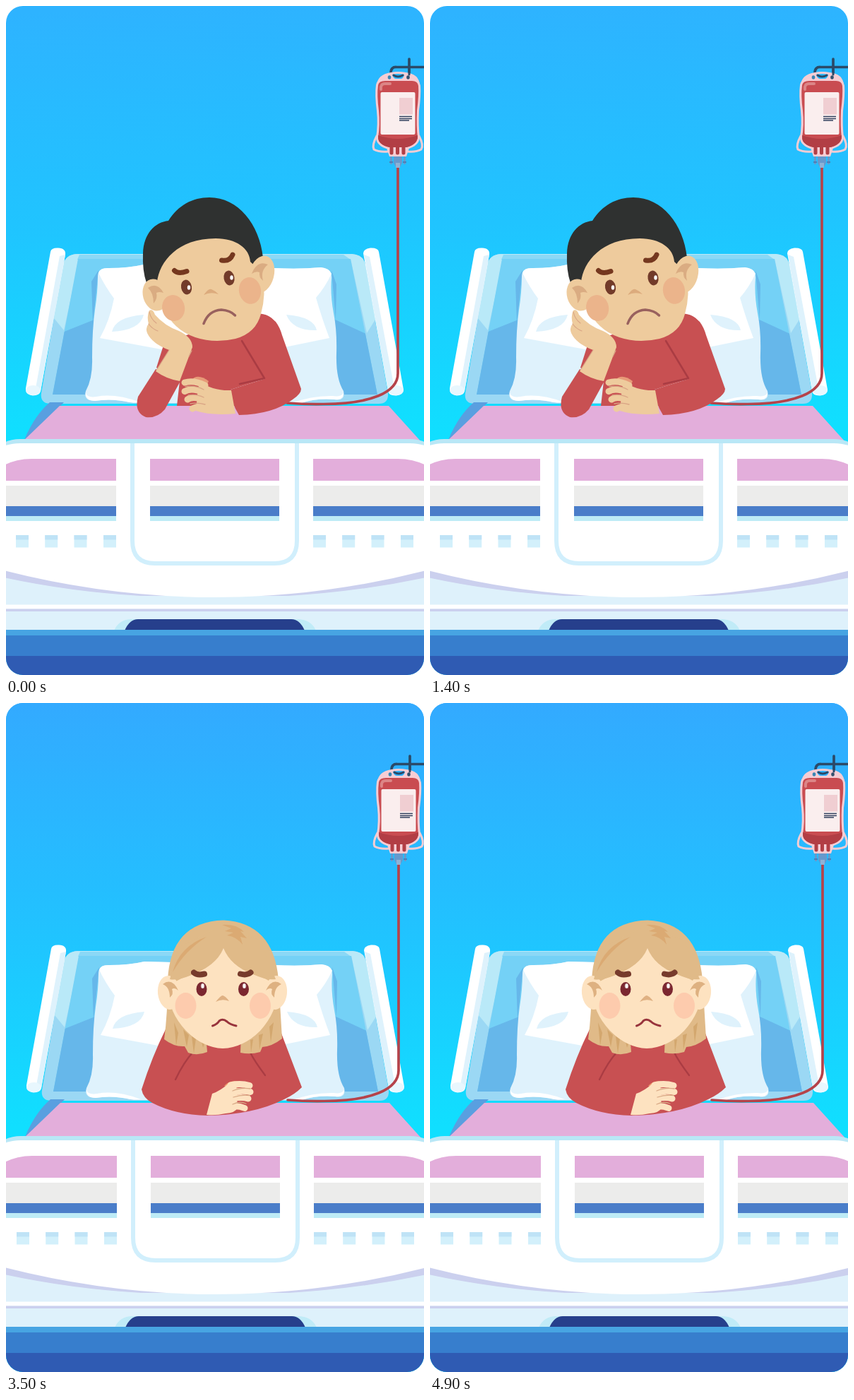
Animation, 592 px wide and 947 px high, one loop 5.6 s. Source, as an HTML page:

```html
<!DOCTYPE html>
<html lang="en">
<head>
<meta charset="utf-8">
<title>Hospital bed</title>
<style>
html, body { margin: 0; width: 100%; height: 100%; overflow: hidden; background: #fff; }
svg { display: block; width: 100vw; height: 100vh; }
.room { animation: nudge 5.6s step-end infinite; }
.second { animation: second 5.6s step-end infinite; }
.first { animation: first 5.6s step-end infinite; }
.glance { animation: glance 1.4s step-end infinite; }
.peek { animation: peek 1.4s step-end infinite; }
@keyframes nudge { 0% { transform: none; } 50%, 100% { transform: translateX(1px); } }
@keyframes first { 0% { opacity: 1; } 50%, 100% { opacity: 0; } }
@keyframes second { 0% { opacity: 0; } 50%, 100% { opacity: 1; } }
@keyframes glance { 0% { transform: none; } 50%, 100% { transform: translate(-6.5px, 2px); } }
@keyframes peek { 0% { transform: none; } 50%, 100% { transform: translate(1.5px, -8px); } }
.line { fill: none; stroke-linecap: round; stroke-linejoin: round; }
</style>
</head>
<body>
<svg viewBox="0 0 592 947" preserveAspectRatio="none">
<defs>
  <clipPath id="card"><rect width="592" height="947" rx="24"/></clipPath>
  <linearGradient id="skyA" gradientUnits="userSpaceOnUse" x1="280" y1="0" x2="300" y2="600">
    <stop stop-color="#2eb3ff"/><stop offset=".5" stop-color="#20c4ff"/><stop offset="1" stop-color="#10dfff"/>
  </linearGradient>
  <linearGradient id="skyB" gradientUnits="userSpaceOnUse" x1="0" y1="0" x2="0" y2="600">
    <stop stop-color="#33aaff"/><stop offset=".5" stop-color="#22c1ff"/><stop offset="1" stop-color="#10dfff"/>
  </linearGradient>
  <clipPath id="board"><path d="M102 358H488L526 550H66Z"/></clipPath>
  <path id="pouch" d="M527 112Q528 106 537 106H575Q583 106 584 113 585 126 582 148 581 170 583 186 582 196 567 200H543Q527 196 527 186 530 168 528 148 525 126 527 112Z"/>
  <g id="tile"><path fill="#d3f0fb" d="M0 749h18v17.500h-18z"/><path fill="#bfe3f6" d="M0 749h18v6.500h-18z"/></g>
  <g id="tiles"><use href="#tile"/><use href="#tile" x="41.200"/><use href="#tile" x="82.500"/><use href="#tile" x="124"/></g>
</defs>

<g clip-path="url(#card)">
<rect width="592" height="947" fill="url(#skyA)"/>
<rect class="second" width="592" height="947" fill="url(#skyB)"/>

<g class="room">
  <!-- headboard -->
  <path fill="#9bd8f4" d="M100 351H490Q506 352 509 366L541 548Q542 563 528 563H62Q48 562 50 548L80 368Q84 352 100 351Z"/>
  <path fill="#b9e9f8" d="M100 351H490Q506 352 509 366L523 444 511 463 488 358H104L82 459 68 442 80 368Q84 352 100 351Z"/>
  <path fill="#8ad8f6" d="M104 352H478L488 359H101Z"/>
  <g clip-path="url(#board)">
    <path fill="#74d1f6" d="M60 358H535V566H60Z"/>
    <path fill="#66b7ea" d="M60 470 125 444V566H60ZM462 442 540 478V566H462Z"/>
    <path fill="#66b7ea" d="M131 374L121 390 123 450ZM461 374 468 394 467 445Z"/>
  </g>

  <!-- side rails -->
  <path fill="#fff" d="M63 348 28 541Q27 550 38 551.500 48 551 49 545L84 352Q85 343 74 342.500 64 342 63 348Z"/>
  <path fill="#def2fc" d="M76 354 84 352 49 545 42 541Z"/>
  <ellipse cx="38.500" cy="544" rx="10.500" ry="7" fill="#e8f7fe"/>
  <path fill="#fff" d="M506 350 541 545Q542 552 553 551.500 563 550 563 543L528 348Q527 342 516 342.500 506 344 506 350Z"/>
  <path fill="#def2fc" d="M507 352 515 355 550 541 541 545Z"/>
  <ellipse cx="552.500" cy="544" rx="10.500" ry="7" fill="#e8f7fe"/>

  <!-- pillow -->
  <path fill="#dff2fc" d="M130 382Q131 370 145 371 174 371 195 366L380 371Q415 373 446 370 461 372 461 384 459 408 464 435 469 460 468 492 467 528 478 545 481 560 465 557 440 555 418 562H180Q151 555 126 559 109 559 113 545 123 527 122 498 122 458 126 430 130 405 130 382Z"/>
  <path fill="#fff" d="M131 378Q133 370 147 371 174 371 195 366L380 371Q415 373 446 370 458 371 461 379 452 398 439 413 448 444 458 470L380 486H220L133 470Q147 445 153 414 141 398 131 378Z"/>
  <path fill="#fff" d="M113 547Q114 555 128 553 155 548 190 561H175Q150 555 126 559 112 559 113 547ZM478 547Q476 554 463 552 435 551 405 562H418Q440 555 465 557 478 558 478 547Z"/>
  <path fill="#dff2fc" d="M150 461Q155 440 195 437 190 459 150 461ZM397 437Q436 440 440 459 406 460 397 437Z"/>

  <!-- blanket -->
  <path fill="#599fe0" d="M62 561H82L30 614H26Q40 580 62 561Z"/>
  <path fill="#e3aedb" d="M76 566H542L589 618H22Z"/>

  <!-- footboard -->
  <path fill="#def1fb" d="M-3 790H595V885H-3Z"/>
  <path fill="#cbd0ee" d="M-3 790H595V809Q500 829 400 835H190Q90 829-3 809Z"/>
  <path fill="#b9e7f6" d="M-3 618Q8 613 20 613H572Q584 613 595 618V630H-3Z"/>
  <path fill="#fff" d="M-3 623Q8 619 20 619H572Q584 619 595 623V799Q296 875-3 799Z"/>
  <path fill="#e3aedb" d="M-3 650Q15 641 36 641H156V672H-3ZM204 641H387V672H204ZM435 641H555Q576 641 595 650V672H435Z"/>
  <path fill="#ececeb" d="M-3 679H156V708H-3ZM204 679H387V708H204ZM435 679H595V708H435Z"/>
  <path fill="#4a7dc9" d="M-3 708H156V722H-3ZM204 708H387V722H204ZM435 708H595V722H435Z"/>
  <path fill="#bdebf6" d="M-3 722H156V729H-3ZM204 722H387V729H204ZM435 722H595V729H435Z"/>
  <path fill="none" stroke="#d1effc" stroke-width="6" d="M179 619V757Q179 789 211 789H380Q412 789 412 757V619"/>
  <use href="#tiles" x="14"/><use href="#tiles" x="435"/>
  <path fill="#fff" d="M-3 847.500H595V853.500H-3Z"/>
  <path fill="#cbd0ee" d="M-3 853.500H595V857H-3Z"/>
  <path fill="#c0ebf7" d="M153 884Q160 868 178 868H412Q432 868 439 884Z"/>
  <path fill="#263f8c" d="M168 884Q175 868 187 868H404Q416 868 423 884Z"/>
  <path fill="#47a4e2" d="M-3 883H595V892H-3Z"/>
  <path fill="#377ecd" d="M-3 891H595V921H-3Z"/>
  <path fill="#2f5bb3" d="M-3 920H595V950H-3Z"/>

  <!-- drip -->
  <path class="line" stroke="#b5434a" stroke-width="3.700" d="M555 229V520C555 548 515 563 450 563.500Q425 564 398 562"/>
  <path class="line" stroke="#2b4a68" stroke-width="3.700" d="M595 86.500H553Q545 86 545 95M571 75V98"/>
  <path fill="#f6cdd4" fill-rule="evenodd" d="M525 112Q526 97 545 94 555 92 566 94 585 96 586 112ZM547 97Q548 104 556 104 563 104 564 97 555 95 547 97Z"/>
  <path fill="#f6cdd4" d="M538 198H572L567 213H543Z"/>
  <path class="line" stroke="#f6cdd4" stroke-width="3" d="M525 184Q518 197 521 203 528 207 541 206M585 184Q592 197 588 203 581 207 569 206"/>
  <use href="#pouch" fill="#f6cdd4" stroke="#f6cdd4" stroke-width="6"/>
  <path class="line" stroke="#2b4a68" stroke-width="3" d="M549 98Q555 102 562 98M571 90V97"/>
  <ellipse cx="543" cy="101" rx="2.300" ry="2.800" fill="#3b86b4"/><ellipse cx="569.500" cy="101" rx="2.300" ry="2.800" fill="#34516e"/>
  <use href="#pouch" fill="#c94c51"/>
  <path fill="#b23e45" d="M527 183Q555 193 583 183L583 186Q582 196 567 200H543Q527 196 527 186Z"/>
  <path class="line" stroke="#dc8586" stroke-width="4" d="M531 118Q530 110 537 110H544"/>
  <path class="line" stroke="#b23e45" stroke-width="5" d="M546 198V208M554.500 198V208M563 198V208"/>
  <rect x="530.500" y="122" width="49" height="60" rx="2" fill="#faeeee"/>
  <path fill="#f0ced2" d="M557 130H576V153.500H557Z"/>
  <path stroke="#32405e" stroke-width="1.500" d="M557 156.500H575M557 159.500H575M557 162H571"/>
  <path fill="#6699cd" d="M549 213H561V222L558 228H552L549 222ZM544 213H547V224H544ZM563 213H566V224H563Z"/>
  <path fill="#8eb2d6" d="M552 222H558V229H552Z"/>
  <path stroke="#4e7eb5" stroke-width="2" d="M543 221H548M562 221H567"/>
</g>

<!-- boy -->
<g class="first">
  <path fill="#c85052" d="M225 474 213 512 246 531 242 566H330L318 543 366 528 385 455Q378 437 360 435.500L330 446Z"/>
  <path fill="#c85052" d="M212 514 187 553Q181 575 198 582 214 584 225 571L247 531Z"/>
  <path fill="#c85052" d="M334 474 340 440Q366 430 382 447 388 455 391 466L418 542Q418 549 406 557 378 578 330 579 319 562 318 543L366 528Z"/>
  <path class="line" stroke="#aa3c43" stroke-width="2.500" d="M334 474 366 527 331 535"/>

  <path fill="#2f3130" d="M199 392Q193 375 194 350C195 322 211 306 230 304 244 282 264 271 288 271 329 271 359 309 364 356L330 390 214 397Z"/>
  <g fill="#eecb9d">
    <ellipse cx="362" cy="380" rx="17.500" ry="27" transform="rotate(15 362 380)"/>
    <ellipse cx="211" cy="409" rx="17" ry="23" transform="rotate(-16 211 409)"/>
    <path d="M214 391C217 362 243 329 297 329 326 329 345 343 346 362L363 378Q369 408 361 436 354 463 325 471 295 478 268 469 236 458 224 428Z"/>
  </g>
  <path fill="#daac82" d="M201 399Q214 390 223 406 217 404 213 406 215 414 209 421 209 406 201 399ZM371 366Q356 359 348 379 354 375 359 377 358 384 364 389 360 374 371 366Z"/>
  <g fill="#ebb48b"><ellipse cx="237" cy="427.500" rx="16" ry="18.500" transform="rotate(-12 237 427)"/><ellipse cx="345.500" cy="403" rx="15.500" ry="19" transform="rotate(-10 345 403)"/></g>
  <g fill="#723b2a"><ellipse cx="255.500" cy="398" rx="7.500" ry="10.500" transform="rotate(-10 255.500 398)"/><ellipse cx="316" cy="385" rx="7.500" ry="10.500" transform="rotate(-10 316 385)"/></g>
  <g class="glance" fill="#fff"><ellipse cx="259" cy="398.500" rx="2.200" ry="3.300"/><ellipse cx="319.500" cy="384.500" rx="2.200" ry="3.300"/></g>
  <path class="line" stroke="#75381f" stroke-width="7" d="M238.500 374.500Q244 380 256 375.500M305.500 360Q317 362 321 352"/>
  <path fill="#dcab7d" d="M280 409Q287 399 291 401 296 403 301 408 290 404 280 409Z"/>
  <path class="line" stroke="#99615e" stroke-width="3.500" d="M280 449.500Q287 431 305 430 318 431 324.500 438"/>

  <path fill="#eecb9d" d="M212 517 231 487Q207 478 200 463 197 455 202 450 199 438 203 431 208 428 211 437 225 453 245 460 264 469 264 483L246 531Q227 528 212 517Z"/>
  <path class="line" stroke="#d9a585" stroke-width="1.200" d="M203 433Q205 443 213 449M202 450Q207 457 215 460M231 487 214 514M263 488 259 496"/>
  <path fill="#e79a78" d="M262 530Q271 519 287 531L284 538Z"/>
  <path class="line" stroke="#eecb9d" stroke-width="9" d="M282 537Q266 529 253 533M280 547Q263 540 253 545.500M279 557Q264 552 257 557M283 567Q271 566 264 570"/>
  <path fill="#eecb9d" d="M276 532Q292 545 319 544L325 577Q290 580 269 573L272 540Z"/>
  <path class="line" stroke="#d9a585" stroke-width="1.300" d="M254 538.500Q270 537 280 543M258 551Q270 549 280 554M261 563Q271 561 282 564"/>
</g>

<!-- girl -->
<g class="second">
  <path fill="#c85052" d="M226 462Q207 500 192 547 194 559 207 566 240 583 285 584 350 583 394 561 409 554 419 544L389 465Z"/>
  <path class="line" stroke="#aa3c43" stroke-width="2.300" d="M265 494Q252 508 240 533M346 495Q352 507 367 527"/>
  <path fill="#e0ba88" d="M229 392Q233 310 308 307.500 379 311 386 392L391 475Q377 486 363 487L360 494Q346 498 332 495L333 470H283L285 494Q271 500 258 495L253 486Q238 487 224 476 229 440 229 392Z"/>
  <path fill="#d3a76e" d="M238 452 241 485 244 467ZM251 462 256 487 259 470ZM263 472 266 496 269 475ZM277 480 279 488 281 482ZM346 477 347 495 350 476ZM358 470 359 491 364 468ZM373 458 375 481 379 452Z"/>
  <g fill="#fde2c0">
    <ellipse cx="231" cy="410" rx="16" ry="24" transform="rotate(-6 231 410)"/>
    <ellipse cx="382" cy="410" rx="16" ry="24" transform="rotate(6 382 410)"/>
    <path d="M308 347Q297 374 258 386 235 394 231 406 229 436 255 464 279 488 307 489 336 488 360 464 385 436 384 406 377 391 350 384 318 372 308 347Z"/>
  </g>
  <path fill="#e0ba88" d="M308 345Q297 374 255 388 240 393 232 391L245 345 300 318 360 335 382 391Q369 393 350 384 318 372 308 345Z"/>
  <path fill="#deb181" d="M222 398Q235 388 244 407 239 402 235 405 238 412 232 417 232 402 222 398ZM390 398Q377 388 368 407 373 402 377 405 374 412 380 417 380 402 390 398Z"/>
  <path fill="#dbaa73" d="M236 381Q246 344 284 331 254 350 236 381ZM306 314Q326 312 337 324L332 323 341 333 332 331 335 342Q327 331 313 329L322 325 310 323 319 319Z"/>
  <g fill="#fdcbad"><ellipse cx="254.500" cy="428.500" rx="15" ry="18.500"/><ellipse cx="360" cy="428.500" rx="15" ry="18.500"/></g>
  <g fill="#7b2730"><ellipse cx="277" cy="405" rx="7.500" ry="10"/><ellipse cx="336.500" cy="405" rx="7.500" ry="10"/></g>
  <g class="peek" fill="#fff"><ellipse cx="277" cy="408.500" rx="2.300" ry="3.500"/><ellipse cx="336" cy="408.500" rx="2.300" ry="3.500"/></g>
  <path class="line" stroke="#773b2c" stroke-width="8" d="M266 381.500Q271 386 281 383.500M332 383.500Q341 386 346.500 381.500"/>
  <path fill="#dfb183" d="M297 423Q304 414 307 414 311 415 316 422 306 418 297 423Z"/>
  <path class="line" stroke="#98343c" stroke-width="3" d="M292.500 457Q299 455 302 450 307 446 313 451 317 455 326 457"/>

  <path fill="#f0986f" d="M309 542Q319 531 334 538L325 547Z"/>
  <path class="line" stroke="#fde2c0" stroke-width="9" d="M318 541Q332 538 345 541.500M320 551Q334 548 346 550.500M321 560Q334 557 343 560M320 571Q330 570 338 573.500"/>
  <path fill="#fde2c0" d="M284 583 292 553Q304 549 317 537L326 541 328 573Q325 580 311 581 298 584 284 583Z"/>
  <path class="line" stroke="#d9aa86" stroke-width="1.300" d="M321 549Q333 544 346 546M322 558Q334 554 345 555.500M321 568Q331 563 340 567"/>
</g>
</g>
</svg>
</body>
</html>
```
